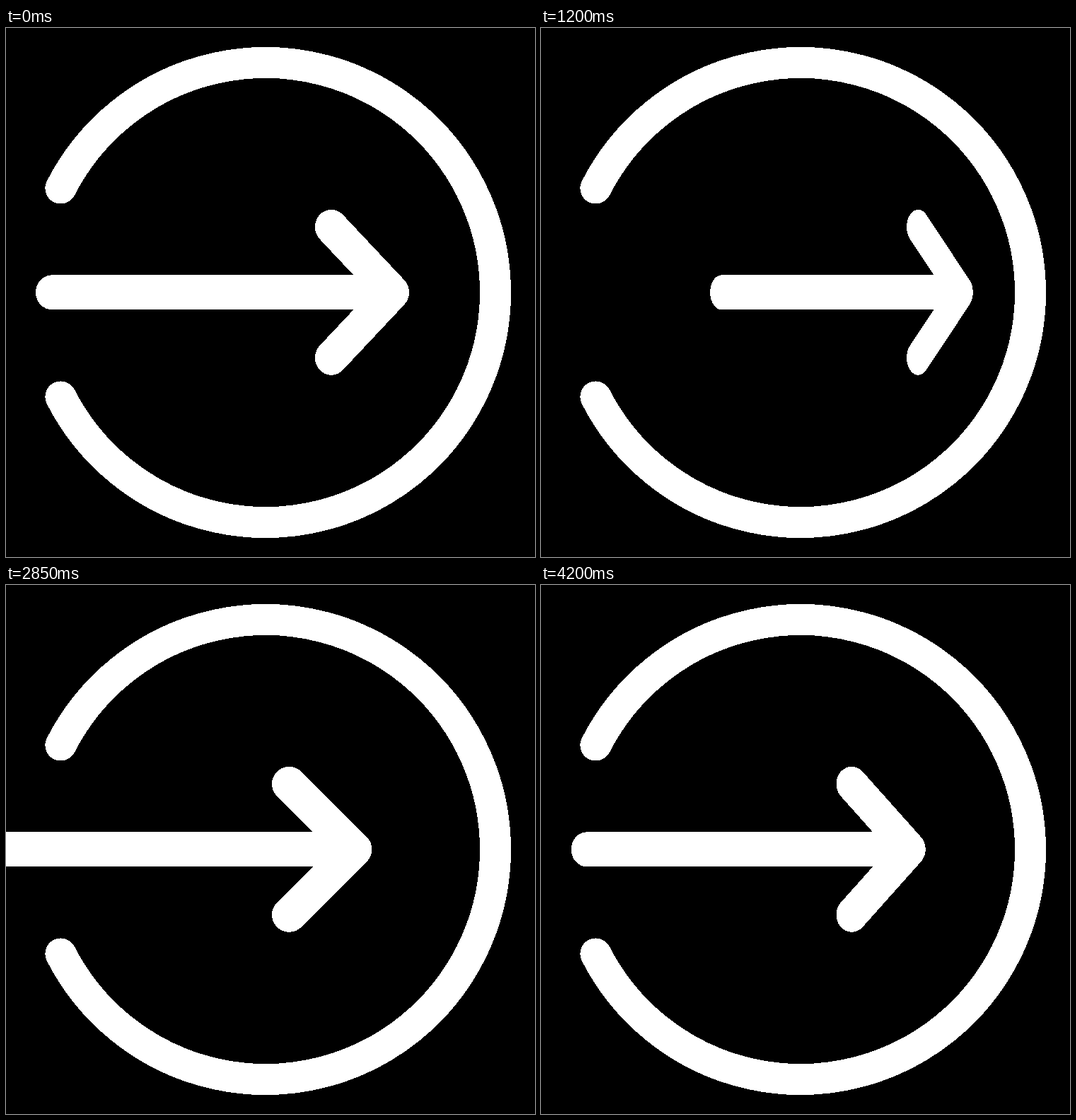
An HTML page for the animation above (4350 ms loop, 748 by 748 pixels).

```html
<!DOCTYPE html>
<html>
<head>
<meta charset="utf-8">
<style>
  html, body { margin: 0; width: 100%; height: 100%; overflow: hidden; background: #000; }
  svg { display: block; width: 100vw; height: 100vh; }
  path { fill: none; stroke: #fff; stroke-linecap: round; stroke-linejoin: round; shape-rendering: crispEdges; }
</style>
</head>
<body>
<svg viewBox="0 0 748 748">
  <path d="M77.4 226.5A325 325 0 1 1 77.4 521.5" stroke-width="44"/>
  <path id="arrow" d="M24.5 0H537M444.5-92.5L537 0 444.5 92.5" stroke-width="49"/>
</svg>
<script>
const LOOP = 4350, HOLD = 4200, STEP = 30, CYCLE = 3250 / 3, LENGTH = 561.5;
const arrow = document.getElementById('arrow');

// Poses: where the tail and the tip of the arrow are
const ready = { tail: 42, tip: 570 };
const inRing = { tail: 671, tip: 700 };
const outside = { tail: -604.5, tip: -43 };
const arrived = { tail: 12, tip: 573.5 };
const rest = { tail: 43, tip: 543.5 };

// Eased move between two poses; power > 1 speeds up, < 1 slows down
function move(from, to, p, power = 1) {
  const e = p ** power;
  return {
    tail: from.tail + (to.tail - from.tail) * e,
    tip: from.tip + (to.tip - from.tip) * e
  };
}

function pose(t) {
  if (t < 335) return move(ready, inRing, t / 335, 1.1);
  if (t < 400) return outside;
  if (t < 715) return move(outside, arrived, (t - 400) / 315, 0.9);
  if (t < 955) return move(arrived, rest, (t - 715) / 240, 0.4);
  return move(rest, ready, Math.max(0, 1 - (CYCLE - t) / STEP));
}

function draw() {
  const now = performance.now() % LOOP;
  const t = Math.min(Math.floor(now / STEP) * STEP, HOLD);
  const { tail, tip } = pose(t % CYCLE);
  arrow.setAttribute('transform', `translate(${tail} 373.8) scale(${(tip - tail) / LENGTH} 1)`);
  requestAnimationFrame(draw);
}
draw();
</script>
</body>
</html>
```
